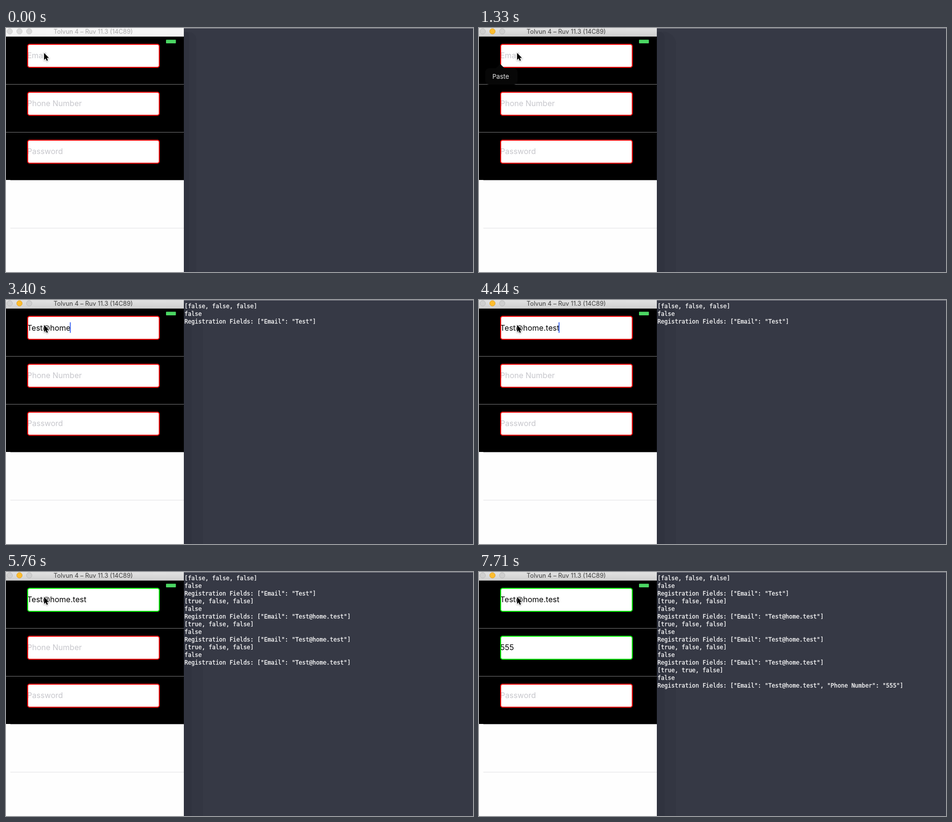
An HTML page with a canvas that plays this animation: 969 by 509 pixels, repeating every 8000 ms.

```html
<!DOCTYPE html>
<html lang="en">
<head>
<meta charset="utf-8">
<title>Form validation</title>
<style>
html, body { margin: 0; width: 100%; height: 100%; overflow: hidden; background: #363945; }
canvas { display: block; }
</style>
</head>
<body>
<canvas id="stage" width="969" height="509"></canvas>
<script>
const ctx = document.getElementById('stage').getContext('2d');
const LOOP = 8000;
const BEAT = 147.6;
const SPLIT = 369;
const UI = 'Inter, "Liberation Sans", sans-serif';
const MONO = '"DejaVu Sans Mono", monospace';
const RED = '#ff0000', GREEN = '#00f500', LINE = '#78787a';

// Keystrokes, one token per beat; an empty token is a pause.
const EMAIL_KEYS = 'T|e|st||@||h|o|me||.|t||es||t'.split('|');
const PHONE_KEYS = '5|5|5'.split('|');

// Beats at which things happen.
const ACTIVATE = 4, MENU = 7, TYPE_EMAIL = 15, EMAIL_OK = 32, TYPE_PHONE = 45, PHONE_OK = 50;
const LOG_BEATS = [19, EMAIL_OK, 39, 39, PHONE_OK];

const clamp = v => Math.min(1, Math.max(0, v));
const fadeIn = (b, start, steps) => clamp((b - start + 1) / steps);
const fadeOut = (b, start, steps) => 1 - fadeIn(b, start, steps);
const typed = (keys, start, b) => keys.slice(0, Math.max(0, b - start + 1)).join('');

function rect(x, y, w, h, color) {
  ctx.fillStyle = color;
  ctx.fillRect(x, y, w, h);
}

function text(str, x, y, font, color, align = 'left') {
  ctx.font = font;
  ctx.fillStyle = color;
  ctx.textAlign = align;
  ctx.fillText(str, x, y);
}

function rounded(x, y, w, h, r, color) {
  ctx.beginPath();
  ctx.roundRect(x, y, w, h, r);
  ctx.fillStyle = color;
  ctx.fill();
}

function polygon(x, y, points) {
  ctx.beginPath();
  points.forEach(([px, py]) => ctx.lineTo(x + px, y + py));
  ctx.closePath();
}

function titleBar(active) {
  const fill = ctx.createLinearGradient(0, 0, 0, 17);
  fill.addColorStop(0, active ? '#e2e2e2' : '#f6f6f6');
  fill.addColorStop(1, active ? '#d0d0d0' : '#f4f4f4');
  rect(0, 0, SPLIT, 18, fill);
  rect(0, 17, SPLIT, 1, active ? '#b4b4b4' : '#dedede');
  for (let i = 0; i < 3; i++) {
    const lit = active && i === 1;
    ctx.beginPath();
    ctx.arc(7.7 + i * 20.2, 7, 5.7, 0, Math.PI * 2);
    ctx.fillStyle = lit ? '#fdbd2f' : active ? '#cfcfcf' : '#dadada';
    ctx.strokeStyle = lit ? '#e0a32a' : active ? '#bababa' : '#cacaca';
    ctx.lineWidth = 1;
    ctx.fill();
    ctx.stroke();
  }
  text('Tolvun 4 – Ruv 11.3 (14C89)', 181, 12, '12.7px ' + UI, active ? '#3c3c3c' : '#a8a8a8', 'center');
}

function field(row, hint, value = '', valid = false, caret = 0) {
  const y = 33 + row * 100;
  const editing = value && caret > 0;
  rounded(45, y + 1, 273, 48, 4, '#fff');
  text(value || hint, 44, y + (editing ? 31 : 30), '16px ' + UI, value ? '#000' : '#c7c7cc');
  const end = value ? ctx.measureText(value).width - 1.5 : 1;
  ctx.globalAlpha = caret;
  rect(44 + end, y + 13.5, 2, 22, '#426bf2');
  ctx.globalAlpha = 1;
  ctx.beginPath();
  ctx.roundRect(45, y + 1, 273, 48, 4);
  ctx.lineWidth = 2;
  ctx.strokeStyle = valid ? GREEN : RED;
  ctx.stroke();
}

function pasteMenu(alpha) {
  ctx.globalAlpha = alpha;
  rounded(13, 84, 67, 34, 8, '#070707');
  polygon(44, 75, [[0, 0], [9, 9], [-9, 9]]);
  ctx.fill();
  text('Paste', 45, 106, '13.2px ' + UI, '#e6e6e6', 'center');
  ctx.globalAlpha = 1;
}

function pointer(x, y) {
  polygon(x, y, [[0, 0], [0, 14.4], [3.3, 11.4], [5.5, 16.4], [7.9, 15.4], [5.8, 10.5], [10, 10.3]]);
  ctx.save();
  ctx.shadowColor = 'rgba(0,0,0,.35)';
  ctx.shadowBlur = 3;
  ctx.shadowOffsetY = 1;
  ctx.lineWidth = 2;
  ctx.strokeStyle = '#fff';
  ctx.stroke();
  ctx.restore();
  ctx.fillStyle = '#000';
  ctx.fill();
}

function emailCaret(b) {
  if (b < TYPE_EMAIL) return clamp(1 - Math.abs(b - 11.5) / 2.5);
  return fadeOut(b, EMAIL_OK + 1, 4);
}

function phone(b) {
  rect(0, 0, SPLIT, 509, '#fefefe');
  rect(0, 18, SPLIT, 299, '#000');
  rect(0, 117, SPLIT, 1, LINE);
  rect(0, 217, SPLIT, 1, LINE);
  rect(9, 317, SPLIT - 9, 1, '#9c9c9e');
  rect(9, 417, SPLIT - 9, 1, '#e1e1e3');
  titleBar(b >= ACTIVATE);
  rounded(332, 24.5, 20.5, 7.5, 1, '#4bd763');

  const phoneCaret = b < TYPE_PHONE ? 0 : fadeOut(b, PHONE_OK, 3);
  field(0, 'Email', typed(EMAIL_KEYS, TYPE_EMAIL, b), b >= EMAIL_OK, emailCaret(b));
  field(1, 'Phone Number', typed(PHONE_KEYS, TYPE_PHONE, b), b >= PHONE_OK, phoneCaret);
  field(2, 'Password');
  pasteMenu(fadeIn(b, MENU, 3) * fadeOut(b, TYPE_EMAIL, 3));
  pointer(79, 52);
}

// Console lines printed at a beat, from the form's state at that moment.
function report(b) {
  const email = typed(EMAIL_KEYS, TYPE_EMAIL, b).replace(/@$/, '');
  const number = typed(PHONE_KEYS, TYPE_PHONE, b);
  const fields = `"Email": "${email}"` + (number && `, "Phone Number": "${number}"`);
  return [
    `[${b >= EMAIL_OK}, ${b >= PHONE_OK}, false]`,
    'false',
    `Registration Fields: [${fields}]`
  ];
}

function terminal(b) {
  rect(SPLIT, 0, 600, 509, '#363945');
  // window shadow, wider while the window is active
  const reach = b >= ACTIVATE ? 40 : 26;
  for (const w of [reach, reach * .4]) {
    rounded(SPLIT, 8, w, 520, [0, w * .65, 0, 0], 'rgba(20,20,32,.08)');
  }
  rect(SPLIT, 0, 600, 1, '#8f9097');
  ctx.strokeStyle = '#fff';
  ctx.lineWidth = .3;
  LOG_BEATS.filter(k => k <= b).flatMap(report).forEach((line, i) => {
    const y = 17 + i * 16;
    text(line, 370.2, y, '11.95px ' + MONO, '#fff');
    ctx.strokeText(line, 370.2, y);
  });
}

function draw(now) {
  const beat = Math.floor(now % LOOP / BEAT);
  terminal(beat);
  phone(beat);
  requestAnimationFrame(draw);
}
requestAnimationFrame(draw);
</script>
</body>
</html>
```
